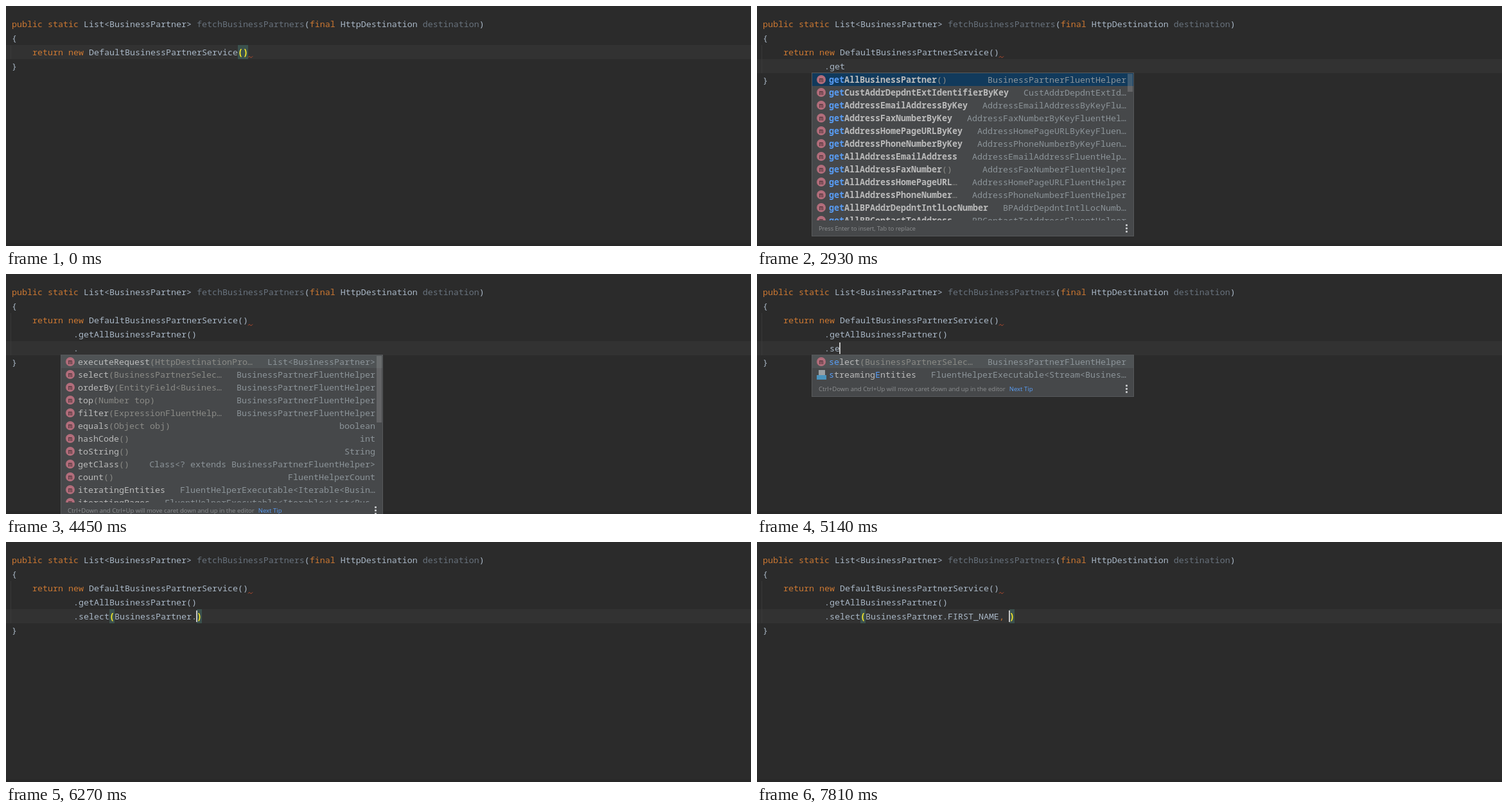
An HTML page that plays this animation: 1160x375 px, repeating every 8 s.

```html
<!DOCTYPE html>
<html lang="en">
<head>
<meta charset="utf-8">
<title>Code completion</title>
<style>
html, body { margin: 0; width: 100%; height: 100%; overflow: hidden; background: #2b2b2b; }
#stage { position: relative; width: 1160px; height: 375px; overflow: hidden; background: #2b2b2b; color: #a9b7c6;
  font: 13.333px "Noto Sans Mono", "DejaVu Sans Mono", monospace; font-variant-ligatures: none; }
#stage div, #stage svg { position: absolute; box-sizing: border-box; white-space: pre; }
.strip { left: 0; top: 371px; width: 1160px; height: 4px; background: #282828; }
.band { left: 0; width: 1160px; height: 22px; background: #323232; }
.guide { left: 7px; top: 61px; width: 1px; background: #393939; }
.line { left: 9px; height: 22px; line-height: 22px; }
.line span { display: inline-block; height: 22px; }
.key { color: #cc7832; }
.dim { color: #68727d; }
.brace { color: #ffef28; background: #3b514d; font-weight: bold; }
.use { background: #344134; }
.caret { width: 2px; height: 18px; background: #c4c4c4; }
.pop { background: #46484a; border: 1px solid #57595b; overflow: hidden; }
.list { left: 0; top: 0; width: 100%; overflow: hidden; }
.row { left: 0; width: 100%; height: 20px; line-height: 20px; color: #bbb; }
.row.on { background: #4f5355; }
.blue .row.on { background: #113a5c; }
.name { left: 26px; }
.bold .name { font-weight: bold; }
.name b { color: #589df6; font-weight: inherit; }
.name i { color: #8a8a86; font-weight: normal; font-style: normal; }
.fields .name i { font-style: italic; }
.type { right: 11px; color: #8c9499; }
.icon { left: 7px; top: 3px; width: 14px; height: 14px; border-radius: 7px; background: #b26d7b;
  color: #35272b; font-size: 11px; line-height: 13px; text-align: center; }
.icon.f { left: 8px; background: #b5873d; }
.icon.c { background: #4a88a8; }
.pin { left: 6px; width: 5px; height: 5px; background: #9aa0a4; transform: rotate(45deg); }
.gray { left: 10px; top: 3px; width: 10px; height: 8px; background: #9aa0a4; }
.sheet { left: 7px; top: 11px; width: 15px; height: 7px; background: #4a93bd; }
.thumb { right: 1px; top: 1px; width: 8px; background: #a6a6a64d; }
.tip { left: 10px; height: 24px; line-height: 25px; color: #8e9092; font-family: "Open Sans", "Noto Sans", sans-serif; }
.tip span { color: #589df6; margin-left: 6px; }
.dot { right: 9px; width: 3px; height: 3px; border-radius: 1px; background: #c4c6c8; }
</style>
</head>
<body>
<div id="stage"></div>
<script>
const LOOP = 8000, LEFT = 9, TOP = 17, CELL = 8, PITCH = 22, ROW = 20, LIST_MAX = 230;
const stage = document.getElementById("stage");
const esc = s => s.replace(/&/g, "&amp;").replace(/</g, "&lt;").replace(/>/g, "&gt;");
const box = (cls, css = "", inner = "") => `<div class="${cls}" style="${css}">${inner}</div>`;
const NEXT = "Ctrl+Down and Ctrl+Up will move caret down and up in the editor";

// Completion rows: name | parameters or value | type
const table = text => text.trim().split("\n").map(r => r.trim().split("|"));

const getters = table(`
getAllBusinessPartner|()|BusinessPartnerFluentHelper
getCustAddrDepdntExtIdentifierByKey||CustAddrDepdntExtId…
getAddressEmailAddressByKey||AddressEmailAddressByKeyFlu…
getAddressFaxNumberByKey||AddressFaxNumberByKeyFluentHel…
getAddressHomePageURLByKey||AddressHomePageURLByKeyFluen…
getAddressPhoneNumberByKey||AddressPhoneNumberByKeyFluen…
getAllAddressEmailAddress||AddressEmailAddressFluentHelp…
getAllAddressFaxNumber|()|AddressFaxNumberFluentHelper
getAllAddressHomePageURL|…|AddressHomePageURLFluentHelper
getAllAddressPhoneNumber|…|AddressPhoneNumberFluentHelper
getAllBPAddrDepdntIntlLocNumber||BPAddrDepdntIntlLocNumb…
getAllBPContactToAddress||BPContactToAddressFluentHelper`);

const methods = table(`
executeRequest|(HttpDestinationPro…|List<BusinessPartner>
select|(BusinessPartnerSelec…|BusinessPartnerFluentHelper
orderBy|(EntityField<Busines…|BusinessPartnerFluentHelper
top|(Number top)|BusinessPartnerFluentHelper
filter|(ExpressionFluentHelp…|BusinessPartnerFluentHelper
equals|(Object obj)|boolean
hashCode|()|int
toString|()|String
getClass|()|Class<? extends BusinessPartnerFluentHelper>
count|()|FluentHelperCount
iteratingEntities||FluentHelperExecutable<Iterable<Busin…
iteratingPages||FluentHelperExecutable<Iterable<List<Bus…`);
const stream = ["streamingEntities", "", "FluentHelperExecutable<Stream<Busines…"];

const fields = table(`
FIRST_NAME| ( = new Busines…|BusinessPartnerField<String>
FORM_OF_ADDRESS| ( = new Bu…|BusinessPartnerField<String>
BUSINESS_PARTNER_FULL_NAME|…|BusinessPartnerField<String>
BUSINESS_PARTNER_PRINT_FORMAT||BusinessPartnerField<Stri…
ALL_FIELDS| ( = () -> "*")|BusinessPartnerSelectable
IS_FEMALE| ( = new Busines…|BusinessPartnerField<Boolean>
IS_MARKED_FOR_ARCHIVING| (…|BusinessPartnerField<Boolean>
LEGAL_FORM| ( = new Busines…|BusinessPartnerField<String>
NAME_FORMAT| ( = new Busine…|BusinessPartnerField<String>
ORGANIZATION_FOUNDATION_DATE||BusinessPartnerField<Local…
PERSON_FULL_NAME| ( = new B…|BusinessPartnerField<String>
LAST_NAME_PREFIX| ( = new B…|BusinessPartnerField<String>`);

const classes = ["", "Field", "FluentHelper", "Selectable"].map(s => ["BusinessPartner" + s, "", ""]);

// Popups: first column of the matched word, line, rows, matched part
const pop = (col, line, rows, mark, more) =>
  ({ col, line, rows, mark, kind: "m", cls: "", tip: NEXT, width: 502, thumb: 0, ...more });
const popGet = pop(13, 3, getters, /^get/, { cls: "bold blue", tip: "Press Enter to insert, Tab to replace", thumb: 28 });
const onMethods = (rows, mark, thumb) => pop(13, 4, rows, mark, { thumb });
const onFields = (rows, mark, more) => pop(36, 4, rows, mark, { kind: "f", cls: "bold fields", ...more });
const popDot = onMethods(methods, null, 104);
const popS = onMethods([methods[1], stream, methods[7]], /^s|S/);
const popSe = onMethods([methods[1], stream], /^se|^s|E/g);
const popSel = onMethods([methods[1]], /^sel/);
const popClass = pop(20, 4, classes, /^Bu/, { kind: "c" });
const popNarrow = onFields(fields, null, { width: 465, thumb: 60 });
const popAll = onFields(fields, null, { thumb: 60 });
const popF = onFields(fields, /F/, { thumb: 187 });
const popFir = onFields([fields[0]], /^FIR/);

// In code lines "|" is the caret, [x] a matched brace, ~x~ a highlighted usage
const sign = "public static List<BusinessPartner> fetchBusinessPartners(final HttpDestination destination)";
const ret = "    return new DefaultBusinessPartnerService", pad = " ".repeat(12);
const get = s => [ret + "()", pad + s];
const next = s => [...get(".getAllBusinessPartner()"), pad + s];
const sel = s => next(`.select[(]${s}[)]`);

// time, caret visible, body lines, popup; without lines the previous ones stay
const steps = [
  [0, 0, [ret + "[(][)]|"]],
  [200, 1],
  [750, 0],
  [950, 1, get("|")],
  [1140, 1, get(".|")],
  [1210, 1, get(".g|")],
  [1340, 1, get(".ge|")],
  [1410, 1, get(".get|")],
  [1940, 0],
  [2070, 0, get(".get|"), popGet],
  [2470, 1],
  [2930, 0],
  [3200, 1, get(".getAllBusinessPartner[(][)]|")],
  [3330, 1, next("|")],
  [3460, 1, next(".|")],
  [3590, 1, next(".|"), popDot],
  [4450, 0],
  [4930, 1, next(".s|"), popDot],
  [5000, 1, next(".s|"), popS],
  [5070, 1, next(".se|"), popS],
  [5140, 1, next(".se|"), popSe],
  [5210, 1, next(".sel|"), popSe],
  [5280, 1, next(".sel|"), popSel],
  [5610, 1, sel("|")],
  [5680, 1, sel("B|")],
  [5740, 1, sel("Bu|")],
  [5810, 1, sel("Bu|"), popClass],
  [6010, 1, sel("BusinessPartner|")],
  [6140, 1, sel("~BusinessPartner~|")],
  [6270, 1, sel("BusinessPartner.|")],
  [6400, 1, sel("BusinessPartner.|"), popNarrow],
  [6470, 1, sel("BusinessPartner.|"), popAll],
  [6670, 1, sel("BusinessPartner.F|"), popAll],
  [6740, 1, sel("BusinessPartner.F|"), popF],
  [6930, 1, sel("BusinessPartner.FI|"), popF],
  [6970, 1, sel("BusinessPartner.FIR|"), popF],
  [7010, 1, sel("BusinessPartner.FIR|"), popFir],
  [7610, 1, sel("BusinessPartner.FIRST_NAME|")],
  [7740, 1, sel("BusinessPartner.FIRST_NAME,|")],
  [7810, 1, sel("BusinessPartner.FIRST_NAME, |")],
];
steps.forEach((s, i) => { if (!s[2]) [s[2], s[3]] = [steps[i - 1][2], steps[i - 1][3]]; });

const TOKEN = /\[(.)\]|~(\w+)~|\b(?:public|static|final|return|new)\b|,|\b(?:fetchBusinessPartners|destination)\b/g;
const paint = s => esc(s.replace("|", "")).replace(TOKEN, (all, brace, use) => {
  const cls = brace ? "brace" : use ? "use" : /^[fd]\w{9,}/.test(all) ? "dim" : "key";
  return `<span class="${cls}">${brace || use || all}</span>`;
});

function icon(kind, name) {
  if (name === stream[0]) return box("gray") + box("sheet");
  const pins = kind === "f" ? box("pin", "top:3px") + box("pin", "top:12px") : "";
  return box("icon " + kind, "", kind) + pins;
}

function drawPopup(p) {
  const listH = Math.min(p.rows.length * ROW, LIST_MAX);
  const rows = p.rows.map(([name, tail, type], i) => {
    const label = p.mark ? name.replace(p.mark, m => `<b>${m}</b>`) : name;
    return box(i ? "row" : "row on", `top:${i * ROW}px`,
      icon(p.kind, name) + box("name", "", `${label}<i>${esc(tail)}</i>`) + box("type", "", esc(type)));
  }).join("");
  const thumb = p.thumb ? box("thumb", `height:${p.thumb}px`) : "";
  const link = p.tip === NEXT ? "<span>Next Tip</span>" : "";
  const tip = box("tip", `top:${listH}px;font-size:${link ? 9.58 : 9.2}px`, p.tip + link);
  const dots = [6, 11, 16].map(y => box("dot", `top:${listH + y}px`)).join("");
  const x = LEFT + p.col * CELL - 28, y = TOP + (p.line + 1) * PITCH - 1;
  return box("pop " + p.cls, `left:${x}px;top:${y}px;width:${p.width}px;height:${listH + 26}px`,
    box("list", `height:${listH}px`, rows + thumb) + tip + dots);
}

function draw([, caretOn, body, popup]) {
  const used = body.some(s => s.includes("~"));
  const head = used ? sign.replace("<BusinessPartner>", "<~BusinessPartner~>") : sign;
  const lines = [head, "{", ...body, "}"];
  const at = lines.findIndex(s => s.includes("|"));
  const col = lines[at].replace(/[\[\]~]/g, "").indexOf("|");
  const y = TOP + at * PITCH;
  stage.innerHTML = box("strip") + box("band", `top:${y}px`) +
    box("guide", `height:${body.length * PITCH}px`) +
    lines.map((s, i) => box("line", `top:${TOP + i * PITCH}px`, paint(s))).join("") +
    `<svg style="left:376px;top:77px" width="10" height="6"><path d="M1 3.5L3 1.5L5 3.5L6 3.5L8 1.5" fill="none" stroke="#bf4d2e"/></svg>` +
    (caretOn ? box("caret", `left:${LEFT + col * CELL - 1}px;top:${y + 2}px`) : "") +
    (popup ? drawPopup(popup) : "");
}

const start = performance.now();
let shown = -1;
function tick() {
  const t = (performance.now() - start) % LOOP;
  const i = steps.findLastIndex(s => s[0] <= t);
  if (i !== shown) draw(steps[shown = i]);
  requestAnimationFrame(tick);
}
tick();
</script>
</body>
</html>
```
